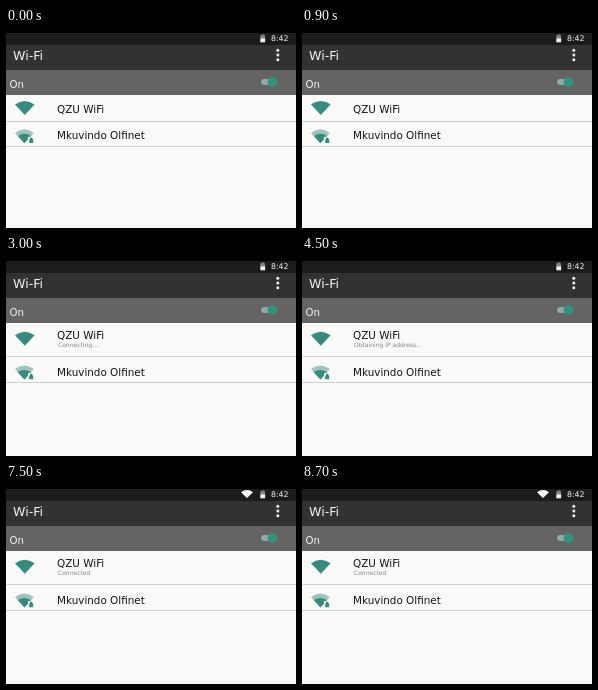
An HTML page for the animation above (9500 ms loop, 290x200 px).

```html
<!DOCTYPE html>
<html lang="en">
<head>
<meta charset="utf-8">
<title>Wi-Fi settings</title>
<style>
  html, body { margin: 0; width: 100%; height: 100%; overflow: hidden; background: #f9faf8; }
  svg { display: block; width: 100vw; height: 100vh; }
  text { font-family: "DejaVu Sans", Verdana, sans-serif; }
  .name { font-size: 10.4px; fill: #111; }
  .status { font-size: 6px; fill: #858585; }
  .light { fill: #f4f4f2; }
  .teal { fill: #358b7d; }
  .pale { fill: #9dc5bc; }
  .rule { fill: #cdcecc; }
</style>
</head>
<body>
<svg viewBox="0 0 290 200">
  <rect width="290" height="200" fill="#f9faf8"/>
  <rect width="290" height="5" fill="#000"/>
  <rect y="5" width="290" height="12" fill="#1c1c1a"/>
  <rect y="17" width="290" height="25" fill="#333231"/>
  <rect y="42" width="290" height="25" fill="#666463"/>

  <path id="signal" fill="#fff" d="M241 14 L235 8.3 Q241 3.9 247 8.3 Z"/>
  <path fill="#858583" d="M254.3 7.3h1.2v-.8h2.4v.8h1.2v3h-4.8z"/>
  <rect class="light" x="254.3" y="10.3" width="4.8" height="4"/>
  <text class="light" x="265" y="13.2" font-size="7.8">8:42</text>

  <text class="light" x="7" y="32" font-size="12.6">Wi-Fi</text>
  <g class="light">
    <circle cx="271.8" cy="22.2" r="1.5"/>
    <circle cx="271.8" cy="27" r="1.5"/>
    <circle cx="271.8" cy="31.8" r="1.5"/>
  </g>

  <text class="light" x="3.5" y="60" font-size="10.2">On</text>
  <rect x="255" y="51" width="15" height="6" rx="3" fill="#8eaaa4"/>
  <circle cx="266.5" cy="54" r="4.9" fill="#309480"/>

  <path id="icon1" class="teal" d="M0 14 L-9.8 3.6 Q0 -3.6 9.8 3.6 Z"/>
  <text id="name1" class="name" x="51">QZU WiFi</text>
  <text id="status" class="status" x="52" y="90.7"></text>
  <rect id="rule1" class="rule" width="290" height="1"/>

  <g id="icon2">
    <path class="pale" d="M0 14 L-9.5 3.6 Q0 -3.6 9.5 3.6 Z"/>
    <path class="teal" d="M0 14 L-6.6 6.8 Q0 2 6.6 6.8 Z"/>
    <rect x="3.7" y="7.6" width="6" height="7" fill="#f9faf8"/>
    <path class="teal" d="M4.8 10.2h.6v-.5a1.4 1.4 0 0 1 2.8 0v.5h.6v3.6h-4z"/>
  </g>
  <text id="name2" class="name" x="51">Mkuvindo Olfinet</text>
  <rect id="rule2" class="rule" width="290" height="1"/>
</svg>
<script>
  const LOOP = 9500;
  const steps = [
    { at: 0, status: "" },
    { at: 1500, status: "Saved" },
    { at: 3000, status: "Connecting..." },
    { at: 4500, status: "Obtaining IP address..." },
    { at: 7500, status: "Connected" }
  ];
  const compact = { icon1: 73, name1: 84.7, rule1: 93, icon2: 101.3, name2: 111, rule2: 118 };
  const expanded = { icon1: 75.7, name1: 83, rule1: 100, icon2: 109.5, name2: 120, rule2: 126 };
  const el = id => document.getElementById(id);

  function place(layout) {
    for (const [id, y] of Object.entries(layout)) {
      if (id.startsWith("icon")) {
        el(id).setAttribute("transform", `translate(${id === "icon1" ? 18.8 : 18.4} ${y})`);
      } else {
        el(id).setAttribute("y", y);
      }
    }
  }

  function render(time) {
    const t = time % LOOP;
    const { status } = steps.findLast(step => step.at <= t);
    place(status ? expanded : compact);
    el("status").textContent = status;
    el("signal").style.display = status === "Connected" ? "" : "none";
  }

  const start = performance.now();
  function tick() {
    render(performance.now() - start);
    requestAnimationFrame(tick);
  }
  tick();
</script>
</body>
</html>
```
